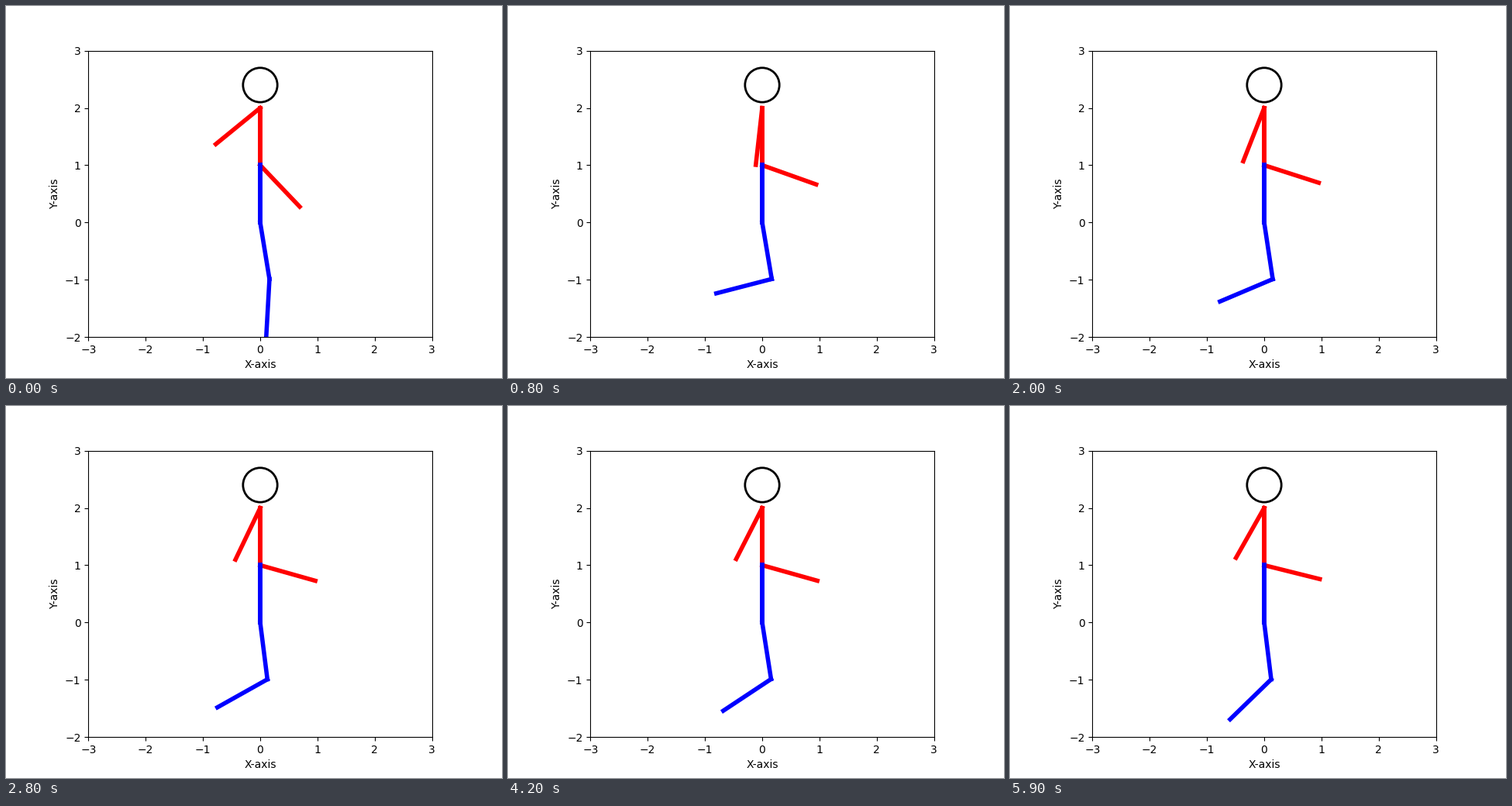
Write a matplotlib script that moves like this. It is 640 px wide and 480 px high and loops after 6000 ms.

```python
import matplotlib.pyplot as plt
import numpy as np
from matplotlib.animation import FuncAnimation

FRAMES = 60
INTERVAL = 100

# Joint angles in degrees away from straight down at a few steps.
# Upper arm and shin open to the left, forearm and thigh to the right.
KEYS = {
    0: (50.8, 43.6, 9.3, 3.2),
    8: (6.4, 70.4, 9.6, 75.5),
    20: (20.3, 71.9, 8.8, 66.8),
    35: (30.2, 76.3, 5.8, 55.4),
    42: (27, 74.3, 8.9, 56.5),
    51: (29.5, 72.4, 4.7, 53.7),
    59: (29.5, 76, 7, 45.8),
}
STEPS = list(KEYS)
JOINTS = list(zip(*KEYS.values()))

# Reach of the wild swings that fade out at the start.
SWINGS = (160, 39, -29, 37)

SHOULDER, ELBOW, HIP = np.array([(0, 2), (0, 1), (0, 0)], float)


def pose_at(step):
    swing = np.sin(np.pi * step / 8) ** 2 * np.exp(-(step / 9) ** 2)
    return [np.interp(step, STEPS, joint) + reach * swing
            for joint, reach in zip(JOINTS, SWINGS)]


def limb_end(start, angle):
    """End of a unit limb hanging from start, turned to the right by angle."""
    a = np.radians(angle)
    return start + np.array([np.sin(a), -np.cos(a)])


fig, ax = plt.subplots(figsize=(6.4, 4.8), dpi=100)
ax.set_xlim(-3, 3)
ax.set_ylim(-2, 3)
ax.set_aspect("equal")
ax.set_xlabel("X-axis")
ax.set_ylabel("Y-axis")
ax.add_patch(plt.Circle((0, 2.4), 0.3, fill=False, color="black", lw=2))


def add_limb(color, width=4):
    return ax.plot([], [], color=color, lw=width)[0]


def place(limb, start, end):
    limb.set_data([start[0], end[0]], [start[1], end[1]])


upper_arm, forearm, torso = add_limb("red"), add_limb("red"), add_limb("red", 4.25)
thigh, shin, pelvis = add_limb("blue"), add_limb("blue"), add_limb("blue", 4.25)
place(torso, SHOULDER, ELBOW)
place(pelvis, ELBOW, HIP)


def update(step):
    arm, fore, upper_leg, lower_leg = pose_at(step)
    knee = limb_end(HIP, upper_leg)
    place(upper_arm, SHOULDER, limb_end(SHOULDER, -arm))
    place(forearm, ELBOW, limb_end(ELBOW, fore))
    place(thigh, HIP, knee)
    place(shin, knee, limb_end(knee, -lower_leg))
    return upper_arm, forearm, thigh, shin


anim = FuncAnimation(fig, update, frames=FRAMES, interval=INTERVAL, repeat=True)
plt.show()
```
